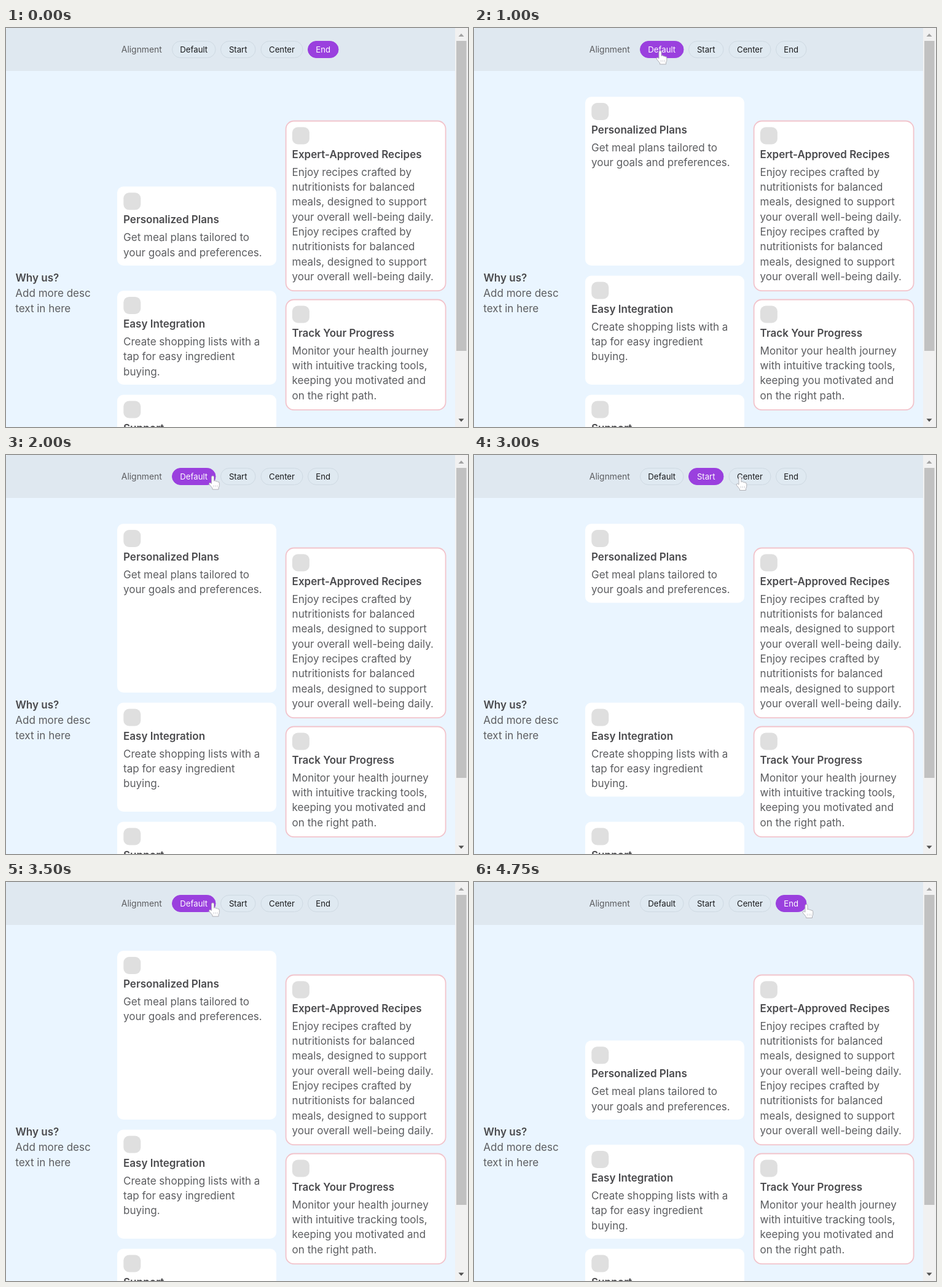
Recreate the animation shown at these times as an HTML page. Size 752 by 650 pixels, loop 5 s.

```html
<!DOCTYPE html>
<html lang="en">
<head>
<meta charset="utf-8">
<title>Card alignment</title>
<style>
  html, body { margin: 0; width: 100%; height: 100%; overflow: hidden; background: #eaf5ff; }
  svg { display: block; width: 752px; height: 650px; font-family: Inter, "Noto Sans", sans-serif; }
  text { font-size: 17.05px; fill: #5c5d60; }
  .title { font-size: 17.05px; font-weight: 600; fill: #4a4a4d; }
  .label { font-size: 13.9px; }
  .icon { fill: #dfdfdf; }
  .card { fill: #fff; }
  .outlined .card { stroke: #f2c3cb; stroke-width: 1.8; }
  .button rect { fill: #dfe9f1; stroke: #ced9e2; }
  .button text { font-size: 13.2px; fill: #18191b; text-anchor: middle; }
  .button.active rect { fill: #9a40de; stroke: #9a40de; }
  .button.active text { fill: #fff; }
</style>
</head>
<body>
<svg id="stage" viewBox="0 0 752 650">
  <rect width="752" height="650" fill="#eaf5ff"/>
  <path d="M0 70V4Q0 0 4 0H731V70Z" fill="#dfe8f0"/>
  <text class="label" x="187.8" y="40">Alignment</text>
  <g id="buttons"></g>
  <text class="title" x="15.5" y="413">Why us?</text>
  <text x="15.3" y="438.4">Add more desc</text>
  <text x="15.3" y="462.6">text in here</text>
  <g id="cards"></g>
  <rect x="731" width="21" height="650" fill="#f1f1f1"/>
  <rect x="733" y="21" width="16.5" height="505" fill="#c1c1c1"/>
  <path d="M736.5 14L741 9L745.5 14Z" fill="#a3a3a3"/>
  <path d="M736.5 636.5L741 641.5L745.5 636.5Z" fill="#505050"/>
  <g id="cursor" fill="#fff" stroke="#b0b0b6" stroke-linejoin="round">
    <path d="M-2 1.5Q-2-.5 0-.5T2 1.5V8Q3 6.8 4.8 7.6L5.4 8.6Q7 7.8 8 9.2Q10.8 8.6 10.8 11.5V15Q10.8 17 9.5 18.5V21.5H-.5V19.5L-5.5 13.5Q-6.5 11.5-5 10.8Q-3.8 10.4-2 12.2Z"/>
    <path d="M1.5 14.5V18M4.5 14.5V18M7.5 14.5V18" stroke="#d3d3d8" fill="none"/>
  </g>
</svg>
<script>
const LOOP = 5000, LINE = 24.35;
const $ = id => document.getElementById(id);

function add(parent, tag, attrs, content = "") {
  const node = document.createElementNS("http://www.w3.org/2000/svg", tag);
  for (const name in attrs) node.setAttribute(name, attrs[name]);
  node.textContent = content;
  return parent.appendChild(node);
}

const buttons = {};
function addButton(name, x, width) {
  const group = buttons[name] = add($("buttons"), "g", { class: "button" });
  add(group, "rect", { x, y: 21.5, width, height: 27, rx: 13.5 });
  add(group, "text", { x: x + width / 2, y: 39.8 }, name);
}
addButton("Default", 270.5, 70.5);
addButton("Start", 349.5, 56.5);
addButton("Center", 415, 68);
addButton("End", 491.5, 49.5);

// Each card is drawn at its own origin; slot is the height of its grid cell.
function addCard(x, y, width, slot, title, lines, outlined = false) {
  const group = add($("cards"), "g", { class: outlined ? "outlined" : "", transform: `translate(${x} ${y})` });
  const box = add(group, "rect", { class: "card", width, height: slot, rx: outlined ? 13 : 10 });
  add(group, "rect", { class: "icon", x: 10.3, y: 10, width: 28, height: 28, rx: 9 });
  add(group, "text", { class: "title", x: 10, y: 60 }, title);
  lines.forEach((line, i) => add(group, "text", { x: 10, y: 89 + i * LINE }, line));
  const natural = 80 + lines.length * LINE;
  return mode => {
    const spare = slot - natural;
    const shift = { Default: 0, Start: 0, Center: spare / 2, End: spare }[mode];
    group.setAttribute("transform", `translate(${x} ${y + shift})`);
    box.setAttribute("height", mode === "Default" ? slot : natural);
  };
}

const recipe = ["Enjoy recipes crafted by", "nutritionists for balanced",
  "meals, designed to support", "your overall well-being daily."];
const alignable = [
  addCard(181, 112, 259, 275, "Personalized Plans",
    ["Get meal plans tailored to", "your goals and preferences."]),
  addCard(181, 403.5, 259, 177.5, "Easy Integration",
    ["Create shopping lists with a", "tap for easy ingredient", "buying."])
];
addCard(181, 597.5, 259, 80, "Support", []);
addCard(455.6, 151.5, 260, 276.7, "Expert-Approved Recipes", [...recipe, ...recipe], true);
addCard(455.6, 442.5, 260, 179.7, "Track Your Progress",
  ["Monitor your health journey", "with intuitive tracking tools,",
   "keeping you motivated and", "on the right path."], true);

// start time, alignment, fingertip position (omitted while the pointer is away)
const steps = [
  [0, "End"],
  [1000, "Default", 303, 37.5],
  [1500, "Start", 433, 36],
  [1750, "Center", 510, 37],
  [2000, "Default", 336.5, 34.5],
  [3000, "Start", 433, 36],
  [3250, "Center", 510, 37],
  [3500, "Default", 336.5, 34.5],
  [4750, "End", 541, 37]
];

let shown;
function show(step) {
  if (step === shown) return;
  shown = step;
  const [, mode, x, y] = step;
  for (const name in buttons) buttons[name].classList.toggle("active", name === mode);
  alignable.forEach(align => align(mode));
  $("cursor").style.display = x === undefined ? "none" : "";
  if (x !== undefined) $("cursor").setAttribute("transform", `translate(${x} ${y})`);
}

const began = performance.now();
function frame() {
  const time = (performance.now() - began) % LOOP;
  show(steps.findLast(([start]) => start <= time));
  requestAnimationFrame(frame);
}
frame();
</script>
</body>
</html>
```
